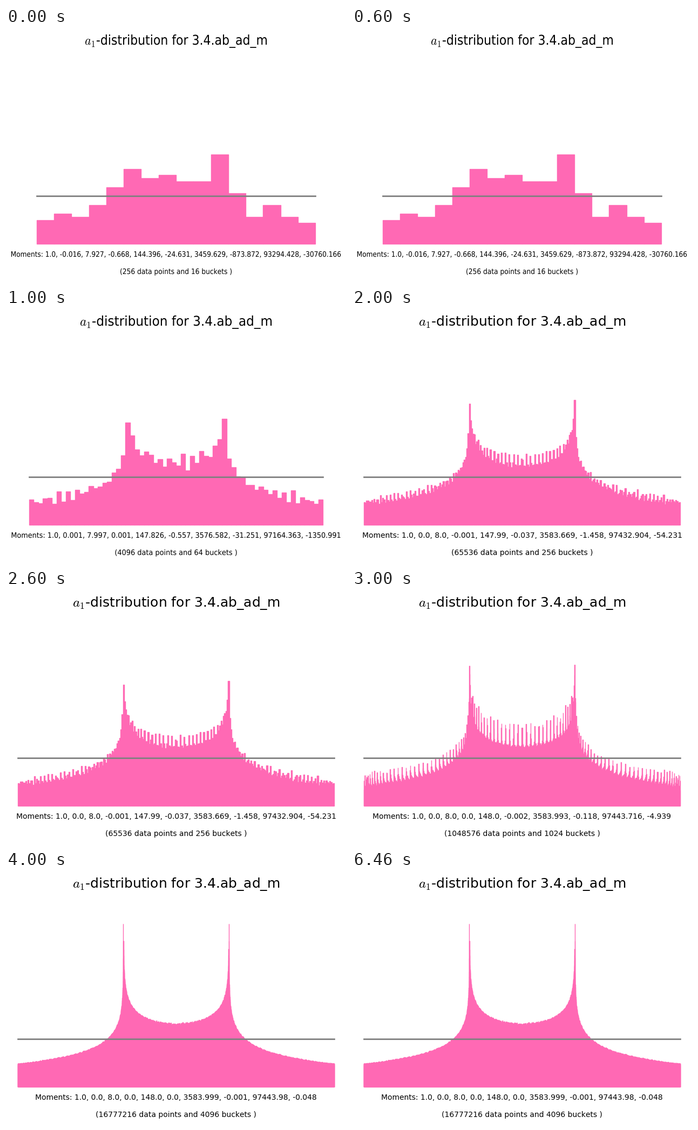
A matplotlib script for the animation above (8.1 s loop, 630x470 px).

```python
import numpy as np
import matplotlib.pyplot as plt
from matplotlib.animation import ArtistAnimation
from matplotlib.collections import PolyCollection
from matplotlib.patches import PathPatch
from matplotlib.textpath import TextPath, text_to_path
from matplotlib.transforms import Affine2D

W, H, DPI = 630, 470, 100
PAD = 10                     # margin around the widest text
CX = 315.05                  # common centre of bars and labels
HALF = 305 / 1.04            # half width of the histogram
BASE, UNIT = 400.85, 88.6    # bar baseline and height of uniform density
TITLE = "$a_1$-distribution for 3.4.ab_ad_m"
INTERVAL = 100
CHUNK = 1 << 20

plt.rcParams.update({"font.family": "DejaVu Sans", "mathtext.fontset": "cm",
                     "text.kerning_factor": 6})
fig = plt.figure(figsize=(W / DPI, H / DPI), dpi=DPI, facecolor="white")
ax = fig.add_axes([0, 0, 1, 1])
ax.set(xlim=(0, W), ylim=(H, 0))
ax.axis("off")

# Frobenius angles of (1 + 2T)^2 (1 - 5T + 13T^2 - 20T^3 + 16T^4)
ANGLES = [np.arccos((5 + s * np.sqrt(5)) / 8) for s in (1, -1)]


def traces(n):
    """Normalised traces over the degree n extensions."""
    return sum(2 * np.cos(n * a) for a in ANGLES) + 2 - 4 * (n % 2)


def statistics(points, buckets):
    """Bucket heights relative to uniform, and the moments 0 to 9."""
    counts, sums = np.zeros(buckets), np.zeros(10)
    for start in range(1, points + 1, CHUNK):
        x = traces(np.arange(start, min(start + CHUNK, points + 1)))
        counts += np.histogram(x, buckets, range=(-6, 6))[0]
        power = np.ones_like(x)
        for k in range(10):
            sums[k] += power.sum()
            power *= x
    return counts * buckets / points, sums / points


def label(y, text, size):
    return fig.text(CX / W, 1 - y / H, text, fontsize=size,
                    ha="center", va="baseline", color="black")


def squeezed(text, y, squeeze):
    """Outline version of a label, narrowed along with its scene."""
    string, font = text.get_text(), text.get_fontproperties()
    path = TextPath((0, 0), string, size=font.get_size() * DPI / 72)
    box = path.get_extents()
    # Screen text is spaced slightly wider than its outlines.
    outline = text_to_path.get_text_width_height_descent(
        string, font, "$" in string)[0] * DPI / 72
    spacing = text.get_window_extent().width / outline
    place = (Affine2D().translate(-(box.x0 + box.x1) / 2, 0)
             .scale(spacing * squeeze, -1).translate(CX, y))
    text.remove()
    return ax.add_patch(PathPatch(place.transform_path(path),
                                  facecolor="black", linewidth=0))


def scene(points, buckets):
    heights, moments = statistics(points, buckets)
    numbers = ", ".join(str(round(float(m), 3) + 0.0) for m in moments)
    rows = [(31, TITLE, 18),
            (425, f"Moments: {numbers}", 10),
            (457, f"({points} data points and {buckets} buckets )", 10)]
    texts = [label(*row) for row in rows]

    # A scene wider than the stage is narrowed to fit it.
    widest = max(t.get_window_extent().width for t in texts)
    squeeze = W / max(W, widest + 2 * PAD)
    if squeeze < 1:
        texts = [squeezed(t, row[0], squeeze) for t, row in zip(texts, rows)]

    edges = CX + squeeze * HALF * np.linspace(-1, 1, buckets + 1)
    tops = BASE - UNIT * heights
    bars = PolyCollection(
        [[(a, BASE), (b, BASE), (b, t), (a, t)]
         for a, b, t in zip(edges, edges[1:], tops)],
        facecolors="hotpink", edgecolors="hotpink", linewidths=1, zorder=1)
    ax.add_collection(bars, autolim=False)
    line, = ax.plot(edges[[0, -1]], [BASE - UNIT] * 2,
                    color="gray", linewidth=2, zorder=3)
    return [bars, line, *texts]


frames = []
for level, hold in enumerate((10, 10, 10, 10, 41), start=2):
    frames += [scene(16 ** level, 4 ** level)] * hold

anim = ArtistAnimation(fig, frames, interval=INTERVAL, repeat=True,
                       repeat_delay=0, blit=False)
plt.show()
```
